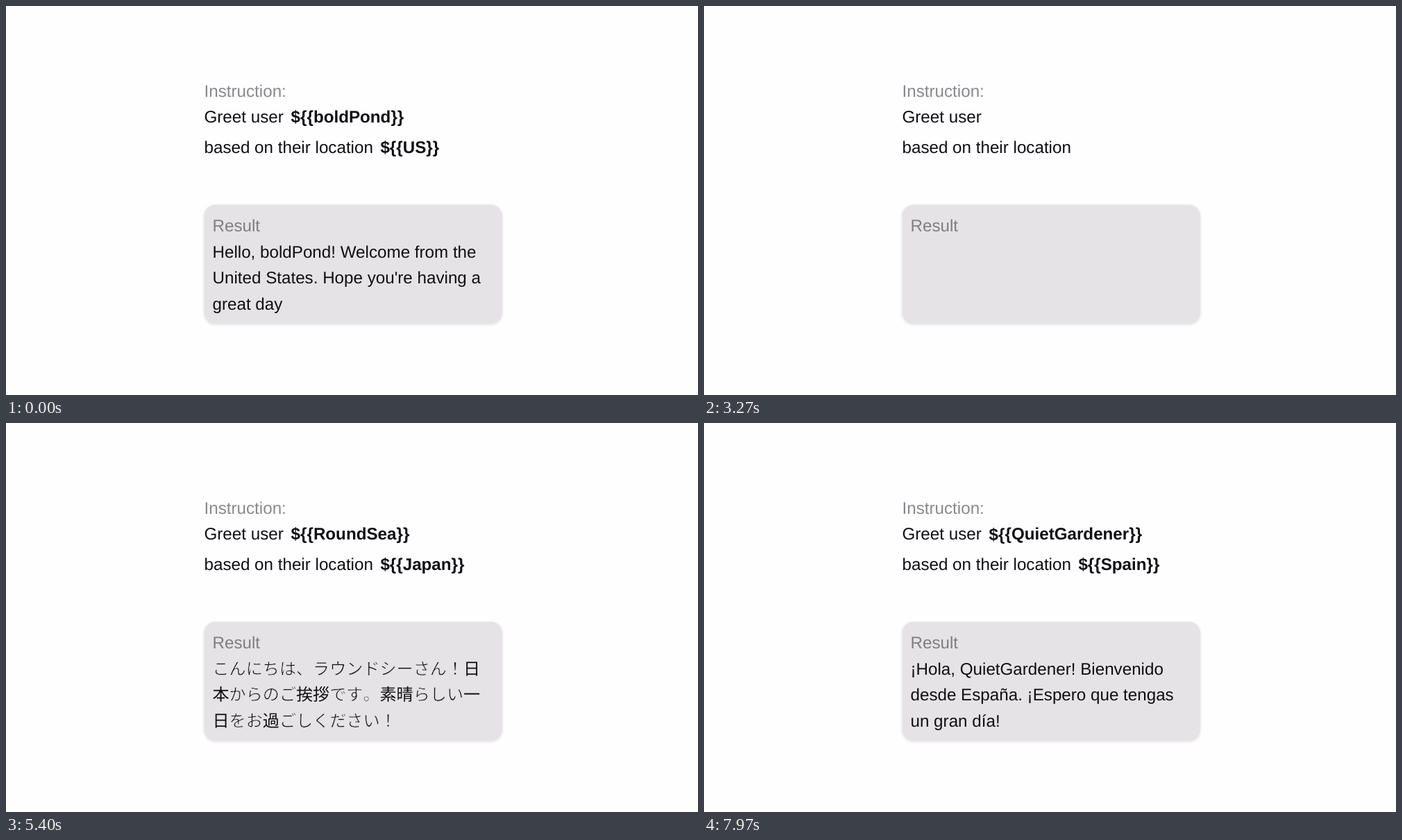
These frames come from a looping animation (997x561 px, 8000 ms). An HTML page with a canvas:

```html
<!DOCTYPE html>
<html lang="en">
<head>
<meta charset="utf-8">
<title>Prompt variables</title>
<style>
  html, body { margin: 0; width: 100%; height: 100%; overflow: hidden; background: #fefdff; }
  canvas { display: block; }
</style>
</head>
<body>
<canvas id="stage" width="997" height="561"></canvas>
<script>
const ctx = document.getElementById('stage').getContext('2d');

const LOOP = 8000;
const SWITCHES = [3000, 7012];
const SIZE = 24.2;
const KANA_PITCH = 24.1;
const ROW_HEIGHT = 43;
const SLIDE = 12;
const STAGGER = 10;
const EXIT_TIME = 150;
const ENTER_TIME = 190;

const PAGE = '#fefdff', PANEL = '#e5e3e6', INK = '#0f0e11';
const SANS = '"Liberation Sans", Arial, sans-serif';
const REGULAR = `${SIZE}px ${SANS}`;
const BOLD = `bold ${SIZE}px ${SANS}`;
const JAPANESE = `${KANA_PITCH}px "Noto Sans CJK JP", "Noto Sans CJK", sans-serif`;

const LINE_Y = [363, 400, 438];
const TEXT_X = 297.5;

const scenes = [
  {
    user: '${{boldPond}}', place: '${{US}}',
    lines: ['Hello, boldPond! Welcome from the',
            "United States. Hope you're having a", 'great day'],
  },
  {
    user: '${{RoundSea}}', place: '${{Japan}}', japanese: true,
    lines: ['こんにちは、ラウンドシーさん！日',
            '本からのご挨拶です。素晴らしい一', '日をお過ごしください！'],
  },
  {
    user: '${{QuietGardener}}', place: '${{Spain}}',
    lines: ['¡Hola, QuietGardener! Bienvenido',
            'desde España. ¡Espero que tengas', 'un gran día!'],
  },
];

const rows = [
  { key: 'user', x: 410.6, y: 168, top: 141.5, bottom: 184.6 },
  { key: 'place', x: 539.4, y: 212, top: 184.8, bottom: 228 },
];

const clamp = v => Math.min(1, Math.max(0, v));
const easeOut = v => 1 - (1 - v) ** 2;
const easeInOut = v => v < 0.5 ? 2 * v * v : 1 - 2 * (1 - v) ** 2;

// Lightly underdamped spring from 0 to 1, time in ms
function spring(ms) {
  if (ms <= 0) return 0;
  const zeta = 0.9, x = ms * 0.0225, root = Math.sqrt(1 - zeta * zeta);
  return 1 - Math.exp(-zeta * x) *
    (Math.cos(root * x) + zeta / root * Math.sin(root * x));
}

const wordCount = scene =>
  scene.japanese ? 1 : scene.lines.join(' ').split(' ').length;

function setFont(font, color = INK) {
  ctx.font = font;
  ctx.fillStyle = color;
}

function drawLabel(text, x, y, color) {
  setFont(REGULAR, color);
  ctx.fillText(text, x, y);
}

// Characters roll upwards one after another, the last one first
function drawVariable(row, text, offsetAt) {
  ctx.save();
  ctx.beginPath();
  ctx.rect(row.x - 10, row.top, 400, row.bottom - row.top);
  ctx.clip();
  setFont(BOLD);
  let x = row.x;
  [...text].forEach((char, i) => {
    const offset = offsetAt(text.length - 1 - i);
    if (Math.abs(offset) < ROW_HEIGHT) ctx.fillText(char, x, row.y + offset);
    x += ctx.measureText(char).width;
  });
  ctx.restore();
}

function drawJapanese(lines, { x, alpha }) {
  setFont(JAPANESE);
  ctx.strokeStyle = PANEL;
  ctx.lineWidth = 0.7;
  ctx.lineJoin = 'round';
  lines.forEach((line, row) => [...line].forEach((char, i) => {
    const left = TEXT_X + x + i * KANA_PITCH;
    ctx.globalAlpha = alpha;
    ctx.fillText(char, left, LINE_Y[row]);
    // Thin the kana so that the kanji look heavier
    if (/[\u3001-\u30ff！]/.test(char)) {
      ctx.globalAlpha = 1;
      ctx.strokeText(char, left, LINE_Y[row]);
    }
  }));
  ctx.globalAlpha = 1;
}

function drawResult(scene, poseAt) {
  if (scene.japanese) {
    const pose = poseAt(0);
    if (pose.alpha > 0) drawJapanese(scene.lines, pose);
    return;
  }
  setFont(REGULAR);
  const space = ctx.measureText(' ').width;
  let index = 0;
  scene.lines.forEach((line, row) => {
    let left = TEXT_X;
    for (const word of line.split(' ')) {
      const { x, alpha } = poseAt(index++);
      ctx.globalAlpha = alpha;
      ctx.fillText(word, left + x, LINE_Y[row]);
      left += ctx.measureText(word).width + space;
    }
  });
  ctx.globalAlpha = 1;
}

// A new text starts only after every part of the previous one has left
function drawScene(index, t) {
  const scene = scenes[index], previous = scenes[index - 1];
  const entry = SWITCHES[index - 1], exit = SWITCHES[index] ?? Infinity;
  const leaving = t >= exit;

  for (const row of rows) {
    const start = previous ? entry + 415 + 13 * previous[row.key].length : -LOOP;
    drawVariable(row, scene[row.key], i => {
      const delay = i * STAGGER;
      return leaving
        ? -ROW_HEIGHT * easeInOut(clamp((t - exit - delay) / EXIT_TIME))
        : ROW_HEIGHT * (1 - spring(t - start - delay));
    });
  }

  const start = previous ? entry + 490 + 10 * wordCount(previous) : -LOOP;
  drawResult(scene, i => {
    const delay = i * STAGGER;
    if (leaving) {
      const p = clamp((t - exit - delay) / EXIT_TIME);
      return { x: -SLIDE * p, alpha: 1 - p };
    }
    const p = easeOut(clamp((t - start - delay) / ENTER_TIME));
    return { x: SLIDE * (1 - p), alpha: p };
  });
}

function drawPanel() {
  ctx.save();
  ctx.shadowColor = 'rgba(0, 0, 0, 0.14)';
  ctx.shadowBlur = 4;
  ctx.shadowOffsetY = 1;
  ctx.fillStyle = PANEL;
  ctx.beginPath();
  ctx.roundRect(285.7, 286.7, 429, 171.6, 16);
  ctx.fill();
  ctx.restore();
}

function render(t) {
  ctx.fillStyle = PAGE;
  ctx.fillRect(0, 0, 997, 561);
  drawPanel();
  drawLabel('Instruction:', 285.5, 131, '#8a888c');
  drawLabel('Greet user', 285.5, 168, INK);
  drawLabel('based on their location', 285.5, 212, INK);
  drawLabel('Result', TEXT_X, 325, '#807e82');

  scenes.forEach((scene, i) => {
    const visibleFrom = SWITCHES[i - 1] ?? 0;
    const visibleTo = (SWITCHES[i] ?? LOOP) + 450;
    if (t >= visibleFrom && t < visibleTo) drawScene(i, t);
  });
}

ctx.textRendering = 'geometricPrecision';
ctx.textBaseline = 'alphabetic';
const origin = performance.now();

function tick() {
  render((performance.now() - origin) % LOOP);
  requestAnimationFrame(tick);
}
tick();
</script>
</body>
</html>
```
